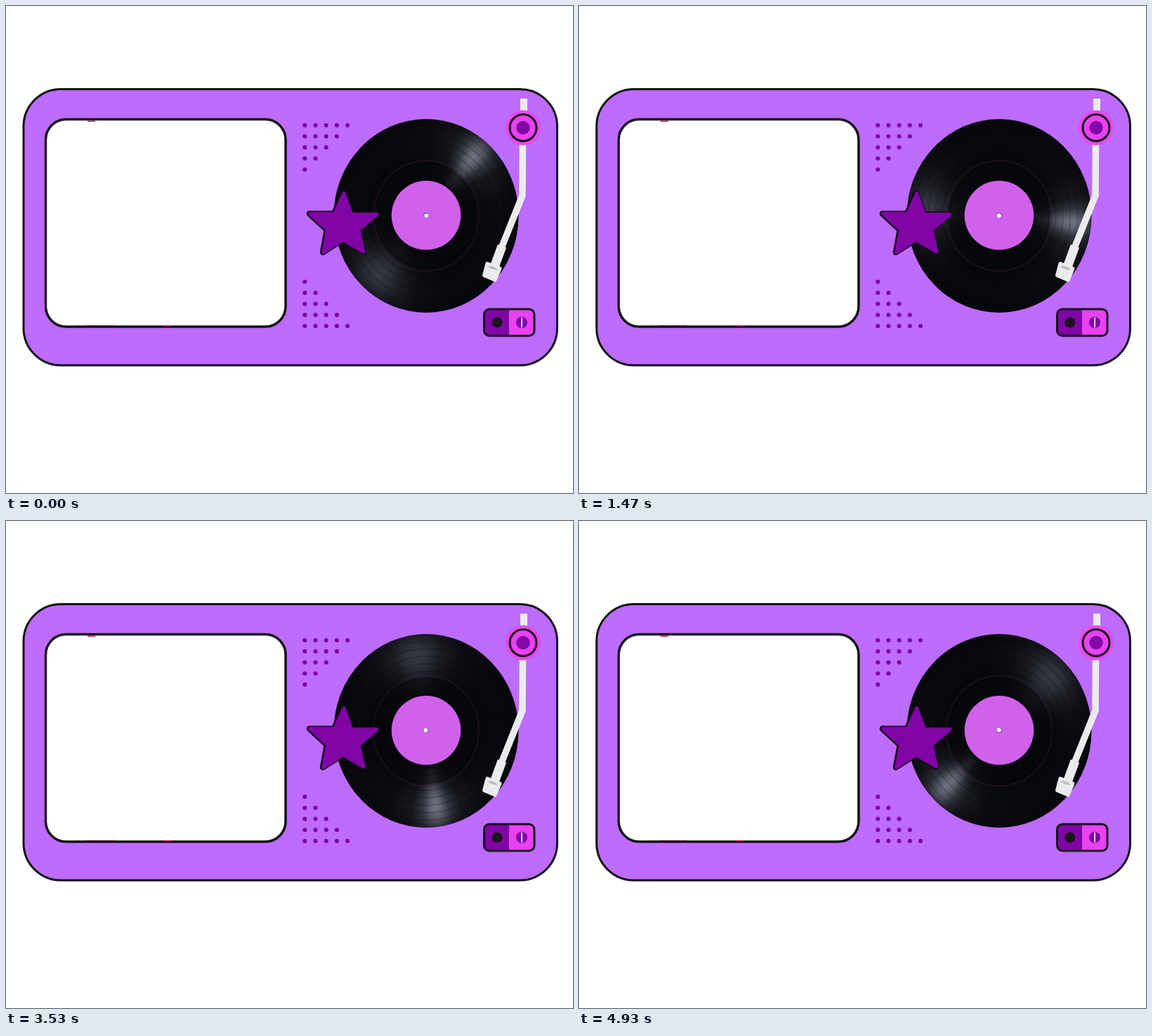
Recreate the animation shown at these times as an HTML page. Size 807 by 694 pixels, loop 4.99 s.

```html
<!DOCTYPE html>
<html lang="en">
<head>
<meta charset="utf-8">
<title>Turntable</title>
<style>
  html, body { margin: 0; width: 100%; height: 100%; overflow: hidden; background: #fff; }
  svg, #disc { position: absolute; left: 0; top: 0; }
  #disc {
    left: 460px; top: 161px; width: 276px; height: 276px;
    transform: scaleX(.953); border-radius: 50%; overflow: hidden; background: #06070b;
  }
  #shine, #grooves { position: absolute; inset: 0; border-radius: 50%; }
  #shine {
    --c: 186 192 216;
    background: conic-gradient(
      rgb(var(--c) / .58), rgb(var(--c) / .5) 4deg, rgb(var(--c) / .25) 10deg,
      rgb(var(--c) / .1) 18deg, rgb(var(--c) / .03) 36deg, rgb(var(--c) / .01) 80deg,
      rgb(var(--c) / .01) 125deg, rgb(var(--c) / .05) 148deg, rgb(var(--c) / .13) 162deg,
      rgb(var(--c) / .23) 172deg, rgb(var(--c) / .27) 180deg, rgb(var(--c) / .23) 188deg,
      rgb(var(--c) / .13) 198deg, rgb(var(--c) / .05) 212deg, rgb(var(--c) / .01) 235deg,
      rgb(var(--c) / .01) 280deg, rgb(var(--c) / .03) 324deg, rgb(var(--c) / .1) 342deg,
      rgb(var(--c) / .25) 350deg, rgb(var(--c) / .5) 356deg, rgb(var(--c) / .58));
    mask-image: radial-gradient(circle, #0000 49px, #0003 58px, #0004 74px,
      #0009 80px, #000e 98px, #000 112px, #000b 128px, #0006 138px);
  }
  #grooves {
    background:
      radial-gradient(circle, #0000 78px, #5a1a4899 78.6px, #0000 79.6px),
      repeating-radial-gradient(circle, #0000 0 9.2px, #0006 9.9px, #0000 10.7px);
  }
</style>
</head>
<body>
<svg width="807" height="694">
  <g stroke="#121214" stroke-width="3">
    <rect x="25" y="118.500" width="759.500" height="393.500" rx="53" fill="#be6bff"/>
    <rect x="56.500" y="161.500" width="341.500" height="295.500" rx="29" fill="#fff" stroke-width="3.500"/>
  </g>
  <path d="M58.600 190V430" stroke="#f9c4e4" stroke-width=".8"/>
  <g fill="none" stroke="#c4145c" stroke-width="1.600">
    <path d="M116 164.200h11M224 455.700h11"/>
    <path d="M101 455.700h3M114 455.700h17M133 455.700h11M146 455.700h8" stroke="#4b1230"/>
  </g>
  <g id="dots" fill="#7b009f"/>
</svg>

<div id="disc"><div id="shine"></div><div id="grooves"></div></div>

<svg width="807" height="694">
  <circle cx="598" cy="298.300" r="49.300" fill="#d061eb"/>
  <g id="hole">
    <circle cx="598" cy="298.300" r="3.600" fill="#6d3b80"/>
    <circle cx="598.300" cy="298.700" r="3" fill="#fff"/>
  </g>

  <defs>
    <path id="star" stroke-linejoin="round"
      d="M480 267L491 297L527 297L501 319L508 350L479 333L451 351L457 319L432 296L467 296Z"/>
  </defs>
  <use href="#star" fill="#17091d" stroke="#17091d" stroke-width="8.500"/>
  <use href="#star" x=".8" fill="#8004a6" stroke="#8004a6" stroke-width="5"/>

  <g fill="none" stroke="#ebebed">
    <path d="M737 132v18" stroke-width="10"/>
    <path d="M735.500 194L735 270L705 345" stroke-width="9.500"/>
    <path d="M706 342L695 372" stroke-width="13"/>
    <path d="M685 367L703 374L696 390.500L680.500 384Z" fill="#ebebed" stroke-width="5" stroke-linejoin="round"/>
  </g>
  <path d="M685 371Q693 369 700 376Q692 377 685 371Z" fill="#bcbcc0"/>

  <circle cx="736" cy="173.500" r="25" fill="#e64af0"/>
  <circle cx="736" cy="173.500" r="19" fill="#e842f1" stroke="#19101d" stroke-width="3"/>
  <circle cx="736" cy="173.500" r="9.700" fill="#8207a8"/>

  <rect x="680.500" y="432" width="71.500" height="38" rx="7.500" fill="#e842f1"/>
  <path d="M716 432v38h-28q-7.500 0-7.500-7.500v-23q0-7.500 7.500-7.500Z" fill="#8004a6"/>
  <rect x="680.500" y="432" width="71.500" height="38" rx="7.500" fill="none" stroke="#19101d" stroke-width="3"/>
  <circle cx="699" cy="451" r="7.600" fill="#1a151d"/>
  <circle cx="734" cy="451" r="8" fill="#8004a6"/>
  <path d="M734 444v14" stroke="#f3dcf8" stroke-width="2"/>
</svg>

<script>
  const LOOP = 4990, FPS = 15, STEP = 2.5, START = 40;
  const $ = id => document.getElementById(id);

  let dots = '';
  for (let row = 0; row < 5; row++) {
    for (let col = 0; col < 5 - row; col++) {
      const x = 425.3 + col * 15.2, dy = row * 15.75;
      for (const y of [170 + dy, 456 - dy]) dots += `<circle cx="${x}" cy="${y}" r="3"/>`;
    }
  }
  $('dots').innerHTML = dots;

  function draw(now) {
    const step = Math.floor((now % LOOP + 3.5) * FPS / 1000);
    const turn = Math.min(step, 74) * STEP;
    $('shine').style.transform = `rotate(${START + turn}deg)`;
    $('hole').setAttribute('transform', `rotate(${turn} 598 298.3)`);
    requestAnimationFrame(draw);
  }
  draw(0);
</script>
</body>
</html>
```
